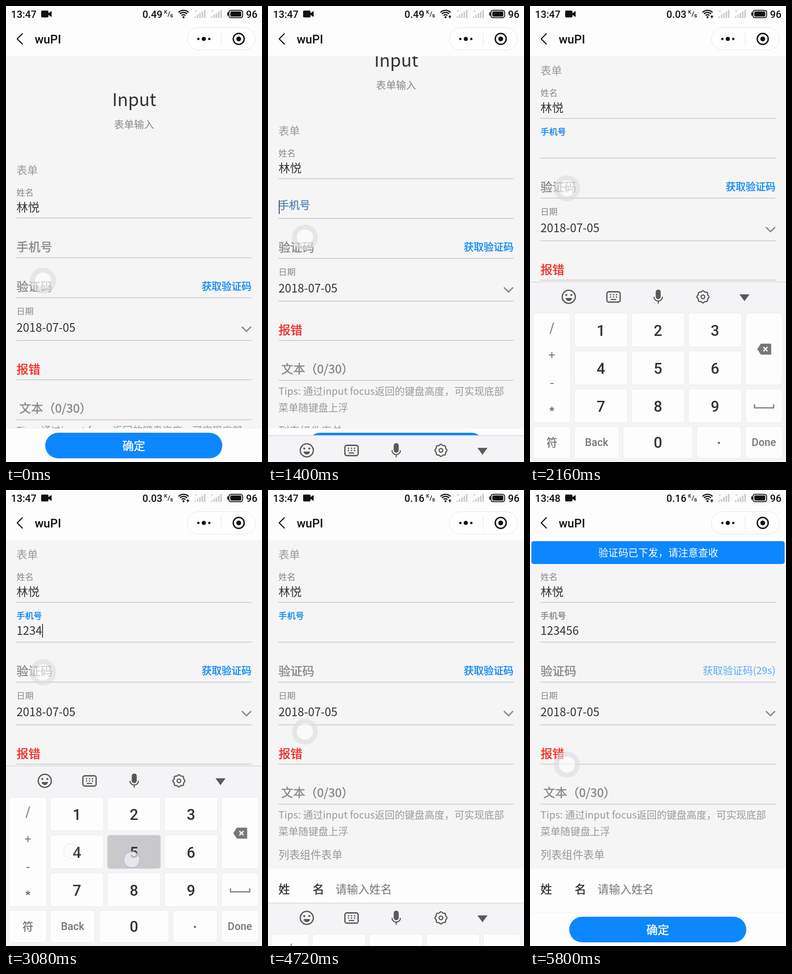
Write an HTML page with a canvas that moves like this. It is 561 px wide and 998 px high and loops after 5840 ms.

```html
<!DOCTYPE html>
<html lang="zh-CN">
<head>
<meta charset="utf-8">
<title>Form input</title>
<style>
html, body { margin: 0; width: 100%; height: 100%; overflow: hidden; background: #fdfdfd; }
canvas { display: block; width: 561px; height: 998px; }
</style>
</head>
<body>
<canvas id="stage"></canvas>
<script>
const W = 561, H = 998, LOOP = 5840;
const CJK = '"Noto Sans CJK SC", "Noto Sans CJK", "Noto Sans SC", sans-serif';
const UI = 'Roboto, "Noto Sans CJK SC", sans-serif';
const BLUE = '#0c87ff', GREY = '#888', DARK = '#333', ICON = '#595959', DIM = '#777';

const canvas = document.getElementById('stage');
const dpr = window.devicePixelRatio || 1;
canvas.width = W * dpr;
canvas.height = H * dpr;
const c = canvas.getContext('2d');

const clamp = v => Math.max(0, Math.min(1, v));
const span = (t, from, length) => clamp((t - from) / length);
const easeOut = x => 1 - (1 - x) * (1 - x);
const backOut = x => 1 + 2 * (x - 1) ** 3 + (x - 1) ** 2;
const mix = (a, b, p) => a + (b - a) * p;

// y is the optical centre of the line
function text(s, x, y, size, color, align = 'left') {
  c.font = `${size}px ${CJK}`;
  c.fillStyle = color;
  c.textAlign = align;
  c.fillText(s, x, y + size * 0.375);
}
// regular glyphs with a hairline outline give a medium weight
function medium(s, x, y, size, color, align = 'left') {
  text(s, x, y, size, color, align);
  c.strokeStyle = color;
  c.lineWidth = size * 0.022;
  c.strokeText(s, x, y + size * 0.375);
}
function ui(s, x, y, size, color, align = 'center', weight = 500) {
  c.font = `${weight} ${size}px ${UI}`;
  c.fillStyle = color;
  c.textAlign = align;
  c.fillText(s, x, y + size * 0.356);
}
function box(x, y, w, h, r, fill, stroke, width = 1) {
  c.beginPath();
  c.roundRect(x, y, w, h, r);
  if (fill) { c.fillStyle = fill; c.fill(); }
  if (stroke) { c.strokeStyle = stroke; c.lineWidth = width; c.stroke(); }
}
function dot(x, y, r, fill) {
  c.beginPath();
  c.arc(x, y, r, 0, Math.PI * 2);
  c.fillStyle = fill;
  c.fill();
}
function arc(x, y, r, color, width, a = 0, b = Math.PI * 2) {
  c.beginPath();
  c.arc(x, y, r, a, b);
  c.strokeStyle = color;
  c.lineWidth = width;
  c.stroke();
}
function trace(points) {
  c.beginPath();
  points.forEach(([x, y]) => c.lineTo(x, y));
}
function poly(points, fill) {
  trace(points);
  c.fillStyle = fill;
  c.fill();
}
function line(points, color, width) {
  trace(points);
  c.strokeStyle = color;
  c.lineWidth = width;
  c.stroke();
}

// key, press, release, pointer offset from the key centre
const taps = [
  ['123', 1860, 1960, -6, 6],
  ['1', 2250, 2350, -8, 8],
  ['2', 2440, 2540, -8, 8],
  ['3', 2660, 2760, -8, 8],
  ['4', 2840, 2940, -13, -2],
  ['5', 3040, 3140, -5, 17],
  ['6', 3280, 3380, -6, 8]
].map(([key, down, up, dx, dy]) => ({ key, down, up, dx, dy }));
const FOCUS = 1352, BLUR = 4580, SHOWN = 4860, NUMERIC = 1960;

function statusBar(t) {
  ui(t < 5800 ? '13:47' : '13:48', 11, 18, 22, '#111', 'left');
  box(77, 10, 16, 15, 2, '#111');
  poly([[90, 17.5], [100, 11], [100, 24]], '#111');
  ui(t < 1500 ? '0.49' : t < 4600 ? '0.03' : '0.16', 299, 18, 22, '#111', 'left');
  ui('K', 346.5, 13.5, 11, '#111', 'left');
  ui('/', 354, 17.5, 15, '#111', 'left');
  ui('s', 359.5, 20.5, 13, '#111', 'left');

  for (const r of [6, 11, 15.5]) arc(389, 25, r, '#111', 2.6, -Math.PI * 0.75, -Math.PI * 0.25);
  dot(389, 24.5, 2.2, '#111');
  const arrow = t >= 260 && t < 4800 || t >= 5420;
  if (arrow) {
    c.fillStyle = '#fdfdfd';
    c.fillRect(394, 19, 9, 9);
    poly([[398.5, 20], [402, 24], [395, 24]], '#111');
    c.fillStyle = '#111';
    c.fillRect(397.5, 23, 2, 4);
  }

  for (const x of [413, 449]) {
    c.fillStyle = '#c9c9c9';
    for (let i = 0; i < 5; i++) {
      const h = 3 + i * 3.6;
      c.fillRect(x + i * 5.2, 26 - h, 3.2, h);
    }
    line([[x + 1, 9], [x + 5, 13]], '#bbb', 1);
    line([[x + 5, 9], [x + 1, 13]], '#bbb', 1);
  }
  box(488.5, 9.5, 30, 16, 4.5, null, '#111', 2);
  box(491.5, 12, 24, 11, 2, '#111');
  c.fillStyle = '#111';
  c.fillRect(485, 14, 2.5, 7);
  ui('96', 526, 18, 22, '#111', 'left');
}

function navBar(t) {
  c.fillStyle = '#fdfdfd';
  c.fillRect(0, 0, W, 110);
  statusBar(t);
  line([[36.5, 60], [24.5, 72], [36.5, 84]], '#111', 2.4);
  ui('wuPI', 63, 73, 26, '#111', 'left');
  box(397.5, 47.5, 149, 49, 24.5, '#fefefe', '#e4e4e6');
  line([[471.5, 57], [471.5, 87]], '#e0e0e2', 1);
  dot(421.5, 72, 2.6, '#111');
  dot(433.5, 72, 4.6, '#111');
  dot(445.5, 72, 2.6, '#111');
  arc(510, 72, 12, '#111', 3);
  dot(510, 72, 5.3, '#111');
}

function phoneField(t) {
  const p = span(t, 1320, 200);
  const tint = p * (1 - span(t, SHOWN, 120));
  const color = `rgb(${mix(136, 12, tint)},${mix(136, 132, tint)},${mix(136, 250, tint)})`;
  medium('手机号', 23, 527 - 34 * p ** 1.9, mix(26.2, 18.7, p), color);

  const typed = taps.slice(1).filter(k => t >= k.up);
  const value = typed.map(k => k.key).join('');
  if (t < BLUR || t >= SHOWN) text(value, 23, 526, 25.2, DARK);
  if (t >= FOCUS && t < BLUR) {
    const since = t - (typed.length ? typed[typed.length - 1].up : FOCUS);
    if (since % 1000 < 500) {
      c.font = `25.2px ${CJK}`;
      const x = value ? 23 + c.measureText(value).width : 23.5;
      c.fillStyle = '#4a505c';
      c.fillRect(x, 511, 2.2, 30);
    }
  }
}

function page(t) {
  c.save();
  c.beginPath();
  c.rect(0, 110, W, 814);
  c.clip();
  c.fillStyle = '#f5f5f6';
  c.fillRect(0, 110, W, 814);
  c.translate(0, -Math.round(218 * easeOut(span(t, FOCUS, 220))));

  text('Input', 281, 204.6, 38.6, DARK, 'center');
  text('表单输入', 280.5, 259, 22, GREY, 'center');
  text('表单', 23, 359, 23.4, '#999');
  text('姓名', 23, 408, 18.7, GREY);
  text('林悦', 23, 441, 25.2, DARK);
  phoneField(t);
  medium('验证码', 23, 614, 26.2, GREY);
  if (t < 4980) medium('获取验证码', 538, 613, 21.8, BLUE, 'right');
  else text(`获取验证码(${t < 5560 ? 30 : 29}s)`, 538, 613, 22, '#5aacfb', 'right');
  text('日期', 23, 668, 18.7, GREY);
  text('2018-07-05', 23, 704, 25.2, DARK);
  line([[517, 702], [527, 712], [537, 702]], GREY, 3);
  medium('报错', 23, 795, 26.2, '#f42b23');
  medium('文本（0/30）', 29, 880.5, 26.2, GREY);
  for (const y of [464, 551, 638.5, 732, 818, 905.5]) line([[23, y], [538, y]], '#c4c4c5', 1.6);
  text('Tips: 通过input focus返回的键盘高度，可实现底部', 23, 929, 21.8, '#999');
  text('菜单随键盘上浮', 23, 965, 21.8, '#999');
  text('列表组件表单', 23, 1016, 23.4, '#999');

  c.fillStyle = '#fdfdfd';
  c.fillRect(0, 1047, W, 120);
  medium('姓', 23, 1092, 25, DARK);
  medium('名', 98, 1092, 25, DARK);
  text('请输入姓名', 148, 1092, 24.7, DIM);
  c.restore();
}

function bottomBar() {
  c.fillStyle = '#fdfdfd';
  c.fillRect(0, 924, W, 74);
  line([[0, 924.5], [W, 924.5]], '#f3f3f4', 1);
  box(86, 934, 388, 56, 28, BLUE);
  medium('确定', 280, 962.5, 25, '#fff', 'center');
}

function toast(t) {
  if (t < 4980) return;
  c.save();
  c.beginPath();
  c.rect(0, 109, W, 100);
  c.clip();
  c.translate(0, mix(-54, 0, easeOut(span(t, 4980, 240))));
  box(3, 112, 555, 50, 5, BLUE);
  text('验证码已下发，请注意查收', 281, 137, 21.9, '#fff', 'center');
  c.restore();
}

function toolbar() {
  const y = 32.5;
  arc(85, y, 14.3, ICON, 2.8);
  dot(79.5, y - 4, 2.2, ICON);
  dot(90.5, y - 4, 2.2, ICON);
  c.beginPath();
  c.arc(85, y + 2.5, 6.8, 0, Math.PI);
  c.fillStyle = ICON;
  c.fill();

  box(168.5, y - 11, 29, 22.5, 4, null, ICON, 2.8);
  c.fillStyle = ICON;
  for (const dy of [-6, -1]) for (const dx of [-8, -1.4, 5.2]) c.fillRect(183 + dx, y + dy, 2.8, 2.8);
  c.fillRect(177, y + 4.5, 12, 2.4);

  box(275.5, y - 16, 11, 21, 5.5, ICON);
  arc(281, y, 9.3, ICON, 2.4, 0, Math.PI);
  line([[281, y + 9], [281, y + 15]], ICON, 2.4);

  c.beginPath();
  for (let i = 0; i <= 96; i++) {
    const a = i * Math.PI / 48, r = 12.3 + Math.cos(a * 8);
    c.lineTo(379 + r * Math.cos(a), y + r * Math.sin(a));
  }
  c.strokeStyle = ICON;
  c.lineWidth = 2.6;
  c.stroke();
  arc(379, y, 4, ICON, 2.6);
  poly([[459, 27], [481, 27], [470, 42]], ICON);
}

function backspace(y) {
  poly([[498, y], [506, y - 12], [528.5, y - 12], [528.5, y + 12], [506, y + 12]], DIM);
  line([[511.5, y - 4.5], [520.5, y + 4.5]], '#fff', 2.6);
  line([[520.5, y - 4.5], [511.5, y + 4.5]], '#fff', 2.6);
}

function key(t, x, y, w, h, label, size, color = DIM, dy = 0) {
  const tap = label && taps.find(k => k.key === label && t >= k.down && t < k.up + 180);
  const held = tap && t < tap.up;
  box(x, y, w, h, 6, held ? '#c9c9cb' : '#fdfdfd', '#e8e8ec');
  const mx = x + w / 2, my = y + h / 2;
  if (label) {
    if (label.charCodeAt(0) > 255) medium(label, mx, my + dy, size, color, 'center');
    else ui(label, mx, my + dy, size, color);
  }
  if (!tap) return;
  const fade = span(t, tap.up, 180);
  c.globalAlpha = 1 - fade;
  dot(mx + tap.dx, my + tap.dy, 17.5 - 2 * fade, 'rgba(248,248,250,.65)');
  arc(mx + tap.dx, my + tap.dy, 17.5 - 2 * fade, '#b4b9dc', 1.8);
  c.globalAlpha = 1;
}

const columns = [97, 222, 347], rows = [68, 151, 234];

function numberKeys(t) {
  key(t, 7, 68, 82, 240);
  ['/', '+', '-'].forEach((s, i) => medium(s, 48, 100 + i * 59.7, 25, DIM, 'center'));
  medium('*', 48, 285, 29, DIM, 'center');
  for (let i = 0; i < 9; i++) key(t, columns[i % 3], rows[i / 3 | 0], 117, 74, String(i + 1), 33, DARK, 1);
  key(t, 472, 68, 81, 157);
  backspace(147);
  key(t, 472, 234, 81, 74);
  line([[492, 268], [492, 275.5], [534, 275.5], [534, 268]], DIM, 2.6);
  key(t, 7, 316, 82, 70, '符', 23.5);
  key(t, 97, 316, 98, 70, 'Back', 23);
  key(t, 204, 316, 153, 70, '0', 33, DARK);
  key(t, 365, 316, 98, 70);
  dot(414, 352, 2.6, DIM);
  key(t, 472, 316, 81, 70, 'Done', 23);
}

function pinyinKeys(t) {
  key(t, 7, 68, 82, 240);
  medium(',', 48, 92, 30, DIM, 'center');
  arc(48.5, 160, 3.7, DIM, 2);
  medium('?', 48.5, 219, 23, DIM, 'center');
  medium('!', 48.5, 279, 23, DIM, 'center');
  ['分词', 'ABC', 'DEF', 'GHI', 'JKL', 'MNO', 'PQRS', 'TUV', 'WXYZ'].forEach((s, i) => {
    const x = columns[i % 3], y = rows[i / 3 | 0];
    key(t, x, y, 117, 74, s, i ? 27.5 : 24.5, DARK, i ? -2 : -4);
    ui(String(i + 1), x + 58.5, y + 61, 18.5, '#c2c2c4', 'center', 400);
  });
  key(t, 472, 68, 81, 74);
  backspace(106.5);
  key(t, 472, 151, 81, 74, '重输', 21.8);
  key(t, 472, 234, 81, 74, '0', 28);
  key(t, 7, 316, 82, 70, '符', 23.5);
  key(t, 97, 316, 98, 70, '123', 23.5);
  key(t, 204, 316, 153, 70, '拼音', 23.5, DARK);
  key(t, 365, 316, 98, 70, 'CH', 23);
  key(t, 472, 316, 81, 70, 'Done', 23);
}

function keyboard(t) {
  const up = easeOut(span(t, 1379, 285)) - easeOut(span(t, 4575, 285));
  if (up <= 0) return;
  c.save();
  c.translate(0, Math.round(mix(H, 604, up)));
  c.fillStyle = '#f4f4f6';
  c.fillRect(0, 0, W, 400);
  line([[0, 0], [W, 0]], '#d9d9dc', 1.4);
  toolbar();
  (t < NUMERIC ? pinyinKeys : numberKeys)(t);
  c.restore();
}

function floatBall(t) {
  const up = backOut(span(t, 1343, 415)) - backOut(span(t, 4633, 415));
  const y = 601 - 202 * up;
  arc(81, y, 23, 'rgba(222,222,225,.62)', 11);
  dot(81, y, 17.6, 'rgba(253,253,253,.62)');
}

function draw(t) {
  c.setTransform(dpr, 0, 0, dpr, 0, 0);
  c.textBaseline = 'alphabetic';
  c.lineJoin = 'round';
  page(t);
  bottomBar();
  navBar(t);
  toast(t);
  keyboard(t);
  floatBall(t);
}

const start = performance.now();
function tick() {
  draw((performance.now() - start) % LOOP);
  requestAnimationFrame(tick);
}
tick();
</script>
</body>
</html>
```
